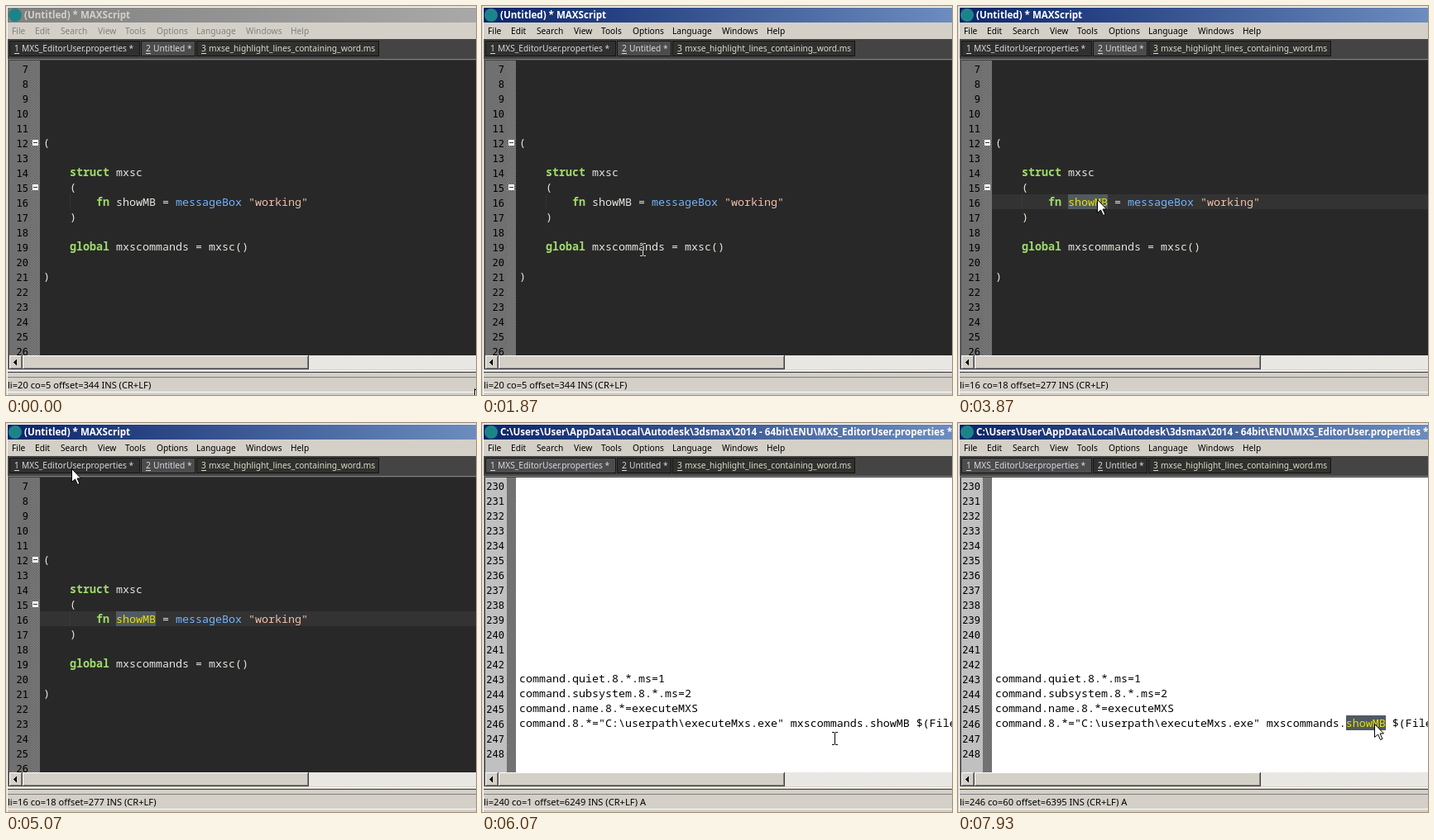
These frames come from a looping animation (568 px wide and 471 px high, 8000 ms). An HTML page with a canvas:

```html
<!DOCTYPE html>
<html lang="en">
<head>
<meta charset="utf-8">
<title>Script editor</title>
<style>
html, body { margin: 0; width: 100%; height: 100%; overflow: hidden; background: #d4d0c8; }
canvas { display: block; }
</style>
</head>
<body>
<canvas id="stage" width="568" height="471"></canvas>
<script>
const W = 568, LOOP = 8000, STEP = 15 / 1000;
const ROW_H = 18, LEFT = 4, TOP = 66, BOTTOM = 423, TEXT_X = 45, CHAR_W = 8;
const ctx = document.getElementById('stage').getContext('2d');

const UI = '"Noto Sans", "Open Sans", sans-serif';
const CODE = '13.333px "Noto Sans Mono", "DejaVu Sans Mono", monospace';
const NUMBERS = '12px "DejaVu Sans Mono", monospace';
const FACE = '#d4d0c8';
const KEY = '#a0dc6c', PLAIN = '#e6e6e0', CALL = '#74b4fc', STR = '#f5bfa8', PAREN = '#ece6d4';

// Each code line is [column, text, colour] runs.
const docs = [
  {
    first: 7, back: '#282828', margin: '#707070', title: '(Untitled) * MAXScript', tail: '',
    lines: {
      12: [[0, '(', PAREN]],
      14: [[4, 'struct', KEY], [11, 'mxsc', PLAIN]],
      15: [[4, '(', PAREN]],
      16: [[8, 'fn', KEY], [11, 'showMB =', PLAIN], [20, 'messageBox', CALL], [31, '"working"', STR]],
      17: [[4, ')', PAREN]],
      19: [[4, 'global', KEY], [11, 'mxscommands = mxsc', PLAIN], [29, '()', PAREN]],
      21: [[0, ')', PAREN]]
    }
  },
  {
    first: 230, back: '#ffffff', margin: '#c0c0c0', tail: ' A',
    title: 'C:\\Users\\User\\AppData\\Local\\Autodesk\\3dsmax\\2014 - 64bit\\ENU\\MXS_EditorUser.properties *',
    lines: {
      243: [[0, 'command.quiet.8.*.ms=1', '#000']],
      244: [[0, 'command.subsystem.8.*.ms=2', '#000']],
      245: [[0, 'command.name.8.*=executeMXS', '#000']],
      246: [[0, 'command.8.*="C:\\userpath\\executeMxs.exe" mxscommands.showMB $(FilePath)', '#000']]
    }
  }
];

// Editor state from step `at` on; `word` is the selected column range.
const states = [
  { at: 0, doc: 0, li: 20, co: 5, off: 344, idle: true, grey: true },
  { at: 28, doc: 0, li: 20, co: 5, off: 344, idle: true },
  { at: 30, doc: 0, li: 19, co: 20, off: 329 },
  { at: 31, doc: 0, li: 19, co: 23, off: 332, word: [11, 22], moved: 36 },
  { at: 48, doc: 0, li: 16, co: 17, off: 276 },
  { at: 51, doc: 0, li: 16, co: 18, off: 277, word: [11, 17], moved: 53, blink: 50 },
  { at: 78, doc: 1, li: 240, co: 1, off: 6249 },
  { at: 95, doc: 1, li: 246, co: 48, off: 6383 },
  { at: 97, doc: 1, li: 246, co: 53, off: 6388, word: [41, 52], moved: 102 },
  { at: 109, doc: 1, li: 246, co: 59, off: 6394 },
  { at: 111, doc: 1, li: 246, co: 60, off: 6395, word: [53, 59], moved: 113 }
];

// Pointer stops: [step, x, y]
const stops = [
  [0, 566, 463], [5, 528, 425], [14, 528, 425], [25, 194, 295], [35, 194, 295],
  [46, 170, 235], [54, 170, 235], [55, 168, 234], [64, 168, 234], [69, 80, 61],
  [73, 80, 61], [76, 79, 55], [81, 79, 55], [90, 426, 385], [94, 424, 363],
  [101, 424, 363], [107, 505, 364], [112, 505, 364], [113, 503, 364], [120, 503, 364]
];

const menus = [['File', 7], ['Edit', 35], ['Search', 66], ['View', 111], ['Tools', 144],
  ['Options', 182], ['Language', 230], ['Windows', 290], ['Help', 344]];
const tabs = [
  { x: 4, w: 158, text: 'MXS_EditorUser.properties *', doc: 1 },
  { x: 163, w: 66, text: 'Untitled *', doc: 0 },
  { x: 230, w: 221, text: 'mxse_highlight_lines_containing_word.ms', doc: 2 }
];

function rect(x, y, w, h, color) {
  ctx.fillStyle = color;
  ctx.fillRect(x, y, w, h);
}

function text(str, x, y, font, color, align = 'left') {
  ctx.font = font;
  ctx.fillStyle = color;
  ctx.textAlign = align;
  ctx.fillText(str, x, y);
}

function bevel(x, y, w, h, light, dark) {
  rect(x, y, w, 1, light);
  rect(x, y, 1, h, light);
  rect(x, y + h - 1, w, 1, dark);
  rect(x + w - 1, y, 1, h, dark);
}

function checker(a, b) {
  const tile = document.createElement('canvas');
  tile.width = tile.height = 2;
  const c = tile.getContext('2d');
  c.fillStyle = a;
  c.fillRect(0, 0, 2, 2);
  c.fillStyle = b;
  c.fillRect(0, 0, 1, 1);
  c.fillRect(1, 1, 1, 1);
  return ctx.createPattern(tile, 'repeat');
}
const foldPattern = checker('#b4b4b4', '#303030');
const trackPattern = checker('#ffffff', FACE);

const rowTop = (doc, line) => TOP + (line - doc.first) * ROW_H;
const colX = col => TEXT_X + col * CHAR_W;

function pointerAt(step) {
  const i = Math.max(1, stops.findIndex(s => s[0] >= step));
  const [a, x0, y0] = stops[i - 1], [b, x1, y1] = stops[i];
  const u = (step - a) / (b - a), k = u * u * (3 - 2 * u);
  return { x: Math.round(x0 + (x1 - x0) * k), y: Math.round(y0 + (y1 - y0) * k) };
}

function drawHeader(state, doc) {
  rect(0, 0, W, 471, FACE);
  rect(1, 1, W, 1, '#fff');
  rect(1, 1, 1, 470, '#fff');
  const bar = ctx.createLinearGradient(2, 0, 900, 0);
  bar.addColorStop(0, state.grey ? '#808080' : '#0a246a');
  bar.addColorStop(1, state.grey ? '#c0c0c0' : '#a6caf0');
  rect(2, 2, W, 18, bar);
  ctx.fillStyle = '#1c8488';
  ctx.beginPath();
  ctx.arc(11, 11, 8, 0, 7);
  ctx.fill();
  text(doc.title, 22, 15, 'bold 11.6px ' + UI, state.grey ? FACE : '#fff');
  for (const [name, x] of menus) text(name, x, 34, '10.2px ' + UI, state.grey ? '#808080' : '#000');
}

function drawTabs(state) {
  rect(2, 40, W, 24, '#444');
  tabs.forEach((tab, i) => {
    const active = tab.doc === state.doc;
    rect(tab.x, 42, tab.w, 19, active ? '#4c4c4c' : '#30302e');
    bevel(tab.x, 42, tab.w, 19, '#141414', '#141414');
    const color = i === 2 ? '#dcdac8' : '#dcd6e2', font = '10.2px ' + UI;
    text(i + 1, tab.x + 6, 55, font, color);
    rect(tab.x + 6, 57, 6, 1, color);
    text(tab.text, tab.x + 15, 55, font, color);
  });
}

function drawLine(doc, line, color) {
  for (const [col, str, tint] of doc.lines[line] || []) {
    const font = (tint === KEY ? 'bold ' : '') + CODE;
    text(str, colX(col), rowTop(doc, line) + 14, font, color || tint);
  }
}

function drawFoldBox(y) {
  rect(31, y, 9, 9, '#707070');
  rect(32, y + 1, 7, 7, '#fff');
  rect(33, y + 4, 5, 1, '#303030');
}

function drawEditor(state, doc, step) {
  // Sunken edge around the editor
  rect(2, 64, W, 378, '#808080');
  rect(3, 65, W, 376, '#404040');

  ctx.save();
  ctx.beginPath();
  ctx.rect(LEFT, TOP, W, BOTTOM - TOP);
  ctx.clip();
  rect(LEFT, TOP, W, BOTTOM - TOP, doc.back);
  rect(LEFT, TOP, 26, BOTTOM - TOP, doc.margin);
  rect(30, TOP, 11, BOTTOM - TOP, foldPattern);

  const y = rowTop(doc, state.li);
  if (state.doc === 0 && !state.idle) rect(41, y, W, ROW_H, '#333');
  for (let i = 0; i < 20; i++) {
    const line = doc.first + i;
    if (line < 249) text(line, 27, TOP + i * ROW_H + 15, NUMBERS, '#000', 'right');
    drawLine(doc, line);
  }
  if (state.doc === 0) {
    for (const line of [12, 15]) drawFoldBox(rowTop(doc, line) + 5);
    const gy = rowTop(doc, 16);
    for (let k = 0; k < ROW_H; k += 2) rect(colX(4), gy + k, 1, 1, '#404040');
  }
  if (state.word) {
    const x = colX(state.word[0]), w = colX(state.word[1]) - x;
    ctx.save();
    ctx.beginPath();
    ctx.rect(x, y, w, ROW_H);
    ctx.clip();
    rect(x, y, w, ROW_H, '#505a60');
    drawLine(doc, state.li, '#e8e000');
    ctx.restore();
  }
  const blinkStart = state.blink || state.at;
  if (!state.idle && (step - blinkStart) % 16 < 8) {
    rect(colX(state.co - 1), y, state.doc ? 2 : 1, ROW_H, '#b4b4b4');
  }
  ctx.restore();
}

function drawFooter(state, doc) {
  rect(LEFT, BOTTOM, W, 17, trackPattern);
  for (const [x, w] of [[4, 16], [20, 346]]) {
    rect(x, BOTTOM, w, 17, FACE);
    bevel(x, BOTTOM, w, 17, '#fff', '#404040');
    rect(x + 1, BOTTOM + 15, w - 2, 1, '#808080');
    rect(x + w - 2, BOTTOM + 1, 1, 15, '#808080');
  }
  for (let k = 0; k < 4; k++) rect(9 + k, 431 - k, 1, 1 + 2 * k, '#000');
  rect(2, 440, W, 31, FACE);
  rect(2, 441, W, 1, '#fff');
  rect(2, 443, W, 1, '#404040');
  rect(2, 449, W, 1, '#808080');
  rect(2, 467, W, 1, '#fff');
  text(`li=${state.li} co=${state.co} offset=${state.off} INS (CR+LF)${doc.tail}`,
    2, 463, '11.1px ' + UI, '#000');
}

function drawArrow(x, y) {
  const shape = [[0, 0], [0, 16], [4, 12.5], [7, 19], [9.5, 18], [6.5, 11.5], [11, 11.5]];
  ctx.beginPath();
  for (const [dx, dy] of shape) ctx.lineTo(x + dx + 0.5, y + dy + 0.5);
  ctx.closePath();
  ctx.fillStyle = '#fff';
  ctx.fill();
  ctx.strokeStyle = '#000';
  ctx.lineWidth = 1;
  ctx.stroke();
}

function drawBeam(x, y) {
  ctx.save();
  ctx.globalCompositeOperation = 'difference';
  rect(x, y - 7, 1, 14, '#fff');
  for (const dy of [-8, 7]) {
    rect(x - 3, y + dy, 3, 1, '#fff');
    rect(x + 1, y + dy, 3, 1, '#fff');
  }
  ctx.restore();
}

function drawPointer(state, doc, step) {
  const { x, y } = pointerAt(step);
  const inText = x > 41 && y >= TOP && y < BOTTOM;
  const top = rowTop(doc, state.li);
  const overWord = state.word && step >= state.moved && y >= top && y < top + ROW_H &&
    x >= colX(state.word[0]) && x < colX(state.word[1]);
  if (inText && !overWord) drawBeam(x, y);
  else drawArrow(x, y);
}

function draw(time) {
  const step = Math.min(119, Math.floor((time % LOOP + 4) * STEP));
  const state = states.filter(s => s.at <= step).pop();
  const doc = docs[state.doc];
  drawHeader(state, doc);
  drawTabs(state);
  drawEditor(state, doc, step);
  drawFooter(state, doc);
  drawPointer(state, doc, step);
}

const start = performance.now();
function tick() {
  draw(performance.now() - start);
  requestAnimationFrame(tick);
}
tick();
</script>
</body>
</html>
```
